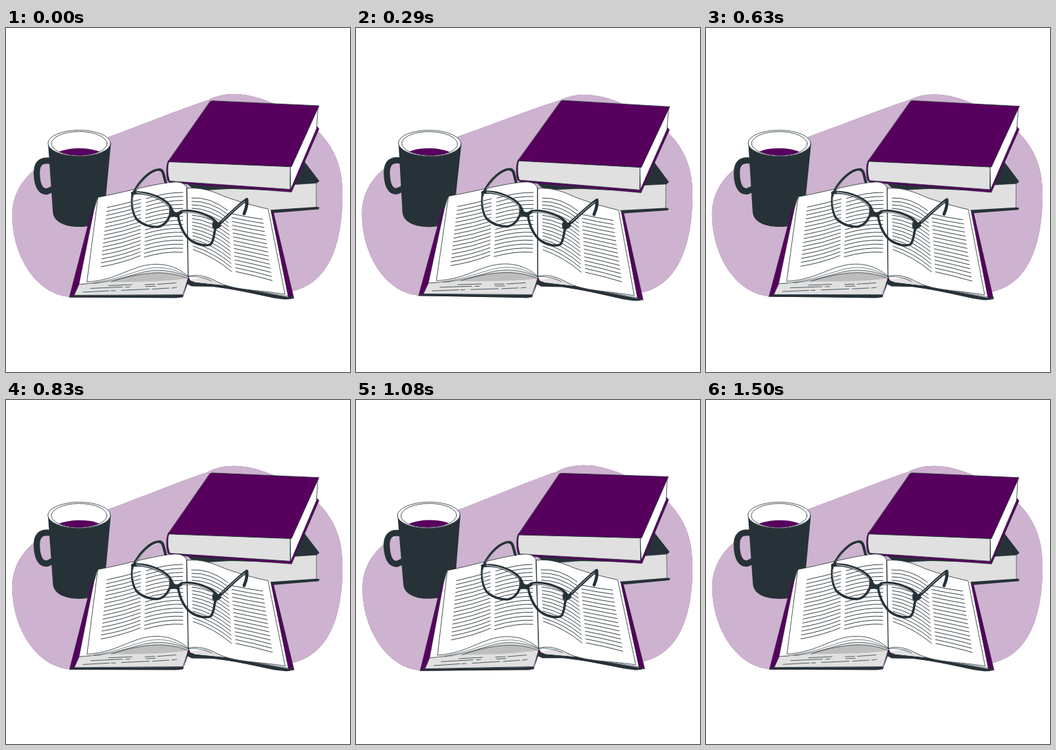
Write an HTML page with a canvas that moves like this. It is 500 by 500 pixels and loops after 1540 ms.

```html
<!DOCTYPE html>
<html lang="en">
<head>
<meta charset="utf-8">
<title>Reading table</title>
<style>
html, body { margin: 0; width: 100%; height: 100%; overflow: hidden; background: #fff; }
canvas { display: block; width: 500px; height: 500px; }
</style>
</head>
<body>
<canvas id="stage" width="500" height="500"></canvas>
<script>
const ctx = document.getElementById('stage').getContext('2d');
const LOOP = 1540;
const PURPLE = '#57005e', DARK = '#263238', GREY = '#e0e0e0', WHITE = '#fff';

function fill(path, color) {
  ctx.fillStyle = color;
  ctx.fill(new Path2D(path));
}

function line(path, width = 0.8, color = DARK) {
  ctx.strokeStyle = color;
  ctx.lineWidth = width;
  ctx.stroke(new Path2D(path));
}

function shape(path, color, width = 0.8) {
  fill(path, color);
  line(path, width);
}

function ellipse(x, y, rx, ry, color, outlined) {
  ctx.beginPath();
  ctx.ellipse(x, y, rx, ry, 0, 0, Math.PI * 2);
  ctx.fillStyle = color;
  ctx.fill();
  if (outlined) {
    ctx.strokeStyle = DARK;
    ctx.lineWidth = 0.8;
    ctx.stroke();
  }
}

// Each row is a quadratic curve blended between the top and bottom row.
function textColumn(top, bottom, rows = 16) {
  ctx.strokeStyle = DARK;
  ctx.lineWidth = 0.9;
  for (let i = 0; i < rows; i++) {
    const p = top.map((v, k) => v + (bottom[k] - v) * i / (rows - 1));
    ctx.beginPath();
    ctx.moveTo(p[0], p[1]);
    ctx.quadraticCurveTo(p[2], p[3], p[4], p[5]);
    ctx.stroke();
  }
}

function drawBlob() {
  const outline = 'M9 272C9 240 26 216 50 200C80 183 115 172 150 158C190 144 250 119 293 105' +
    'C318 92 350 92 392 111C468 143 489 190 489 238C490 306 473 369 418 382' +
    'C370 392 320 369 265 368C200 370 150 392 98 391C45 391 9 331 9 272Z';
  fill(outline, PURPLE);
  fill(outline, 'rgba(255,255,255,.7)');
}

function drawMug() {
  line('M64 193C50 191 44.500 198 44.700 211C45 228 50 239 60 237.500L68 234', 9);
  fill('M61 166L68 266C68 282 86 289 106 289C130 289 141 282 143 268L152.500 168Z', DARK);
  ellipse(106.5, 167.5, 45.5, 19, WHITE, true);
  ellipse(106.5, 168, 40.5, 17.5, WHITE, true);
  ctx.save();
  ctx.beginPath();
  ctx.ellipse(106.5, 168, 40, 17.2, 0, 0, Math.PI * 2);
  ctx.clip();
  ellipse(106.5, 187, 36, 12.3, PURPLE);
  ctx.restore();
}

function drawStack() {
  // lower book
  fill('M262 225L433 193L455.500 222.500L451 226L275 237Z', DARK);
  shape('M276 236.500L335 233L451 225.500L451 263L360 269L300 250Z', GREY, 0.6);
  fill('M360 266L451 260L455.500 260.500L454.500 263.500L375 270Z', DARK);
  fill('M262 225L415 228L415 237L300 233L276 236Z', DARK);

  // upper book
  shape('M236 193C232 199 233 215 235 222L239 225L415 238.500L455 146.500L452 143Z', PURPLE, 0.6);
  shape('M413 202L453.500 113L451.500 146L414 234Z', WHITE);
  shape('M237 194L413 201.500L413 234.500L238 222.500C235 216 234 201 237 194Z', GREY);
  shape('M297 106.500Q299 105.500 303 106L455 113L415 201.500L235.500 194.500Z', PURPLE);
}

function drawOpenBook() {
  // covers
  fill('M125 264L146 255L264 286L382 265L389 268L418.500 393L408 394L265 369L257 391.500L92 391.500Z', PURPLE);
  line('M125 264L92 391.500', 0.6);
  line('M388.500 268L418.500 393', 0.6);
  fill('M260 365L273 369L330 374L418.500 391.500Q415 395 404 394.500L389 392.500L330 380L300 376L270 375.500L263 372L257 390Q254 392.500 246 392.500L92 391.500L94 389Z', DARK);

  // right page block
  fill('M264 359L268 367L275 369.500L318 374L410 391L385 265L381 262Z', WHITE);
  fill('M268 366L290 362L318 374L275 369.500Z', GREY);
  line('M385 265L410.500 390L318 374', 0.7);

  // left page block
  shape('M134 246L132 250L128 264L106 373L265 363L263 233Z', WHITE, 0.6);
  fill('M106 373L265 362L258 388L99 388.500Z', GREY);
  line('M106 373L99 388.500L257 387.500L265 363', 0.7);
  line('M149 374.500L183 373M202 373L216 372.500M220 372.500L247 370.500M123 378.500L169 376.500M174 376.500L180 376.300M203 375.800L217 375.300M112 384L150 382M153 382L159 381.800M168 381.300L208 379.500M213 379.500L237 378M241 378L248 377', 0.75);

  // lifted leaves
  fill('M128 371C164 367 180 359 203 354C228 349 250 355 265 362L263 365C220 370 170 370 128 371Z', GREY);
  fill('M153 369C178 360 208 355 226 356C246 357 257 361 264 364C230 369 190 369 153 369Z', '#bdbdbd');
  line('M128 371C164 367 180 359 203 354C228 349 250 355 265 362', 0.7);
  line('M153 369C178 360 208 355 226 356C246 357 257 361 264 364', 0.7);
  line('M107 372.500C156 369 181 355 205 350C230 345 250 352 265 362', 0.6);

  // top pages
  shape('M134 246C176 238 216 226 244 224C256 223 262 228 263 234L265 361C246 344 222 340 198 346C172 353 154 367 118 369Z', WHITE);
  shape('M263 233C285 231 302 238 318 245C340 253 362 259 381 263L405.500 387C364 380 334 382 307 369C293 361 278 357 265 361Z', WHITE);
  line('M265 361C280 361 289 363 299 368', 0.7);
  line('M263 233L265 361');

  textColumn([147, 261, 171, 256, 196, 249], [138, 347, 168, 342, 195, 331]);
  textColumn([204, 248, 232, 239, 257, 239], [201, 333, 232, 324, 257, 326]);
  textColumn([270, 247, 296, 245, 322, 265], [272, 322, 302, 332, 328, 354]);
  textColumn([328, 270, 351, 275, 373, 278], [334, 354, 363, 360, 387, 367]);
}

function drawGlasses() {
  // temples
  line('M186 239C195 221 211 206 223 206C229 206 229 214 232 224', 4);
  line('M189 235C199 220 212 209 222 208', 0.7, WHITE);
  line('M306 288C322 274 336 259 350 249C351 255 349 263 346 270', 4.500);
  line('M313 281C324 272 337 258 347 252', 0.7, WHITE);

  // lenses and bridge
  line('M184 241C182 256 184 271 191 279C199 286 211 290 221 289C231 287 237 278 240 267', 3.400);
  line('M184 240C205 237 236 249 241 265C244 272 250 272 255 267C273 264 299 272 308 286', 4.600);
  line('M250 272C252 287 259 302 269 309C278 315 292 318 298 314C303 307 302 298 305 288', 3.400);
  line('M190 239.500C207 240 230 249 237 260', 0.9, WHITE);
  line('M257 267.500C274 266 294 273 301 281', 0.9, WHITE);
  line('M184.500 246C183.500 256 186 269 191 276', 0.7, WHITE);
  fill('M300 282L311 283L313 288L305 293L300 290Z', DARK);
  fill('M237 264L246 270L253 268L251 276L244 274L238 274Z', DARK);
}

const groups = [
  { draw: drawBlob, x: 249, y: 244 },
  { draw: drawMug, x: 96, y: 219 },
  { draw: drawStack, x: 344, y: 188 },
  { draw: drawOpenBook, x: 255, y: 309 },
  { draw: drawGlasses, x: 267, y: 261 }
];

// Sway: 0° to 1° to -1° and back, at constant speed.
function swayDegrees(p) {
  if (p < 0.25) return p * 4;
  if (p < 0.75) return 2 - p * 4;
  return p * 4 - 4;
}

function frame() {
  const angle = swayDegrees(performance.now() % LOOP / LOOP) * Math.PI / 180;
  ctx.fillStyle = WHITE;
  ctx.fillRect(0, 0, 500, 500);
  ctx.lineCap = ctx.lineJoin = 'round';
  for (const { draw, x, y } of groups) {
    ctx.save();
    ctx.translate(x, y);
    ctx.rotate(angle);
    ctx.translate(-x, -y);
    draw();
    ctx.restore();
  }
  requestAnimationFrame(frame);
}

frame();
</script>
</body>
</html>
```
